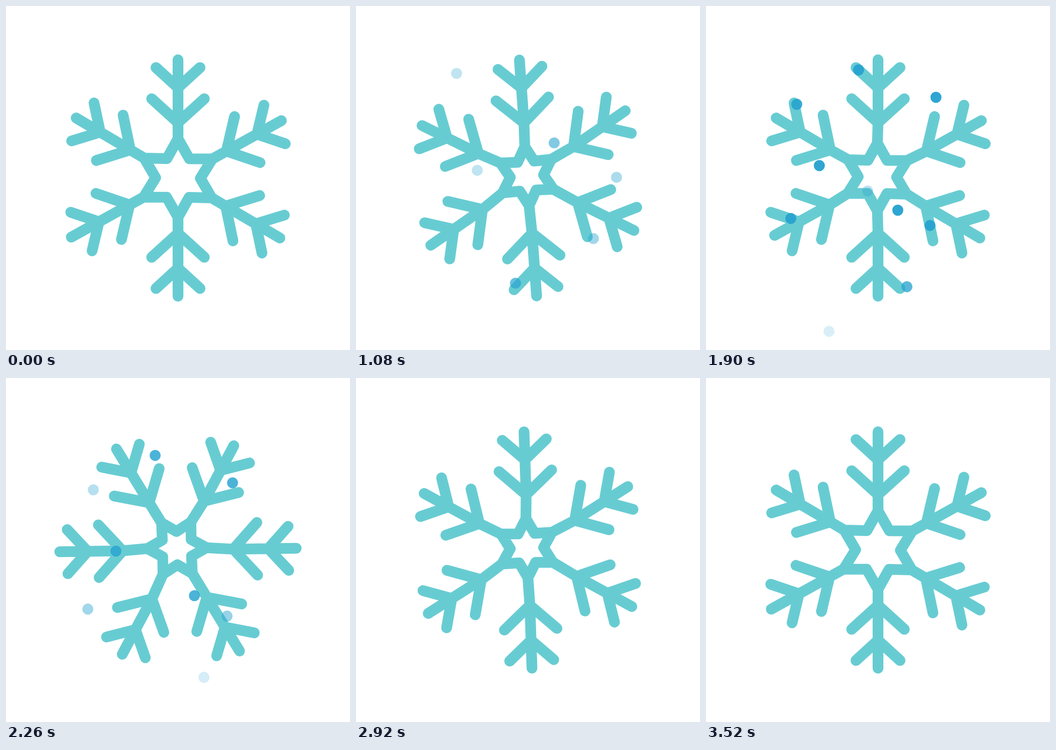
An HTML page with a canvas that plays this animation: 640x640 px, repeating every 3.6 s.

```html
<!DOCTYPE html>
<html lang="en">
<head>
<meta charset="utf-8">
<title>Snowflake</title>
<style>
  html, body { margin: 0; width: 100%; height: 100%; overflow: hidden; background: #fff; }
  canvas { display: block; width: 640px; height: 640px; }
</style>
</head>
<body>
<canvas id="stage" width="640" height="640"></canvas>
<script>
const ctx = document.getElementById('stage').getContext('2d');
const LOOP = 3600, CENTER = 320, RAD = Math.PI / 180;
const ARMS = [-90, -29, 30.5, 90, 151, 210.5];
const LONG_ARM = 4;

const clamp = x => Math.min(1, Math.max(0, x));
const ramp = (t, from, to) => clamp((t - from) / (to - from));
// Ease in and out; `kick` is the speed left at the end
const ease = (u, kick = 0) => u * u * (3 - 2 * u) - kick * u * u * (1 - u);
const smooth = (t, from, to) => ease(ramp(t, from, to));

function flakeAngle(t) {
  const up = 1 - ease(1 - ramp(t, 165, 740), 0.4);
  return 60 * (up - smooth(t, 984, 1551) + smooth(t, 1995, 2550)
    - ease(ramp(t, 2817, 3520), 1));
}

function polar(radius, degrees, x = CENTER, y = CENTER) {
  return [x + radius * Math.cos(degrees * RAD), y + radius * Math.sin(degrees * RAD)];
}

function line(...points) {
  points.forEach((p, i) => i ? ctx.lineTo(...p) : ctx.moveTo(...p));
}

function drawFlake(t) {
  const turn = flakeAngle(t);
  const rest = 1 - smooth(t, 165, 520) + smooth(t, 3180, 3520);
  const pulse = 0.6 * Math.sin(Math.PI * ramp(t, 1250, 2220)) ** 2;
  const open = Math.max(rest, pulse);
  const star = [CENTER - 2 * (1 - open), CENTER - 3.5 * (1 - open)];
  const outer = 55 + 18 * open, inner = 31 + 10.6 * open;
  const outline = [];

  ctx.beginPath();
  ARMS.forEach((base, i) => {
    const angle = base + turn;
    const next = (ARMS[i + 1] ?? 270) + turn;
    const tip = polar(outer, angle, ...star);
    outline.push(tip, polar(inner, (angle + next) / 2, ...star));
    line(tip, polar(103, angle), polar(i === LONG_ARM ? 220 + 7 * rest : 220, angle));
    for (const [along, side, joint] of [[147.5, 49, 103], [205.5, 41, 168]]) {
      const length = Math.hypot(along, side), spread = Math.atan2(side, along) / RAD;
      line(polar(length, angle - spread), polar(joint, angle), polar(length, angle + spread));
    }
  });
  line(...outline);
  ctx.closePath();
  ctx.stroke();
}

// Drift relative to each dot's place at 1460 ms; leftmost at `turnAt`
const sway = (t, turnAt, half, size) => {
  const wave = time => Math.cos(Math.PI * (time - turnAt) / half);
  return size * (wave(1460) - wave(t));
};
const slow = t => [sway(t, 2380, 1380, 12.65), 0.07 * (t - 1460)];
const fast = t => {
  const dt = t - 1460;
  return [sway(t, 2160, 1500, 45.5), 0.11 * dt - 1.12e-5 * dt * dt];
};

// x, y, appears, gone, drift
const DOTS = [
  [296, 88, 1210, 2775, slow], [440, 139, 1210, 2775, slow],
  [223, 266, 1210, 2775, slow], [369, 349, 1210, 2775, slow],
  [181, 152, 930, 2470, slow],
  [263, 559, 720, 2010, fast], [335, 298, 780, 2100, fast],
  [408, 476, 855, 2380, fast], [451, 362, 880, 2560, fast],
  [192, 349, 930, 2530, fast]
];

function drawDot([x, y, start, end, drift], t) {
  const alpha = clamp(Math.min((t - start) / 500, (end - t) / 600));
  if (!alpha) return;
  const [dx, dy] = drift(t);
  ctx.globalAlpha = alpha * 0.98;
  ctx.beginPath();
  ctx.arc(x + dx, y + dy, 10.3, 0, 2 * Math.PI);
  ctx.fill();
}

function draw(t) {
  ctx.globalAlpha = 1;
  ctx.fillStyle = '#fff';
  ctx.fillRect(0, 0, 640, 640);
  ctx.strokeStyle = '#67ccd2';
  ctx.lineWidth = 20;
  ctx.lineCap = ctx.lineJoin = 'round';
  drawFlake(t);
  ctx.fillStyle = '#2aa4d0';
  DOTS.forEach(dot => drawDot(dot, t));
}

function tick() {
  draw(performance.now() % LOOP);
  requestAnimationFrame(tick);
}
tick();
</script>
</body>
</html>
```
